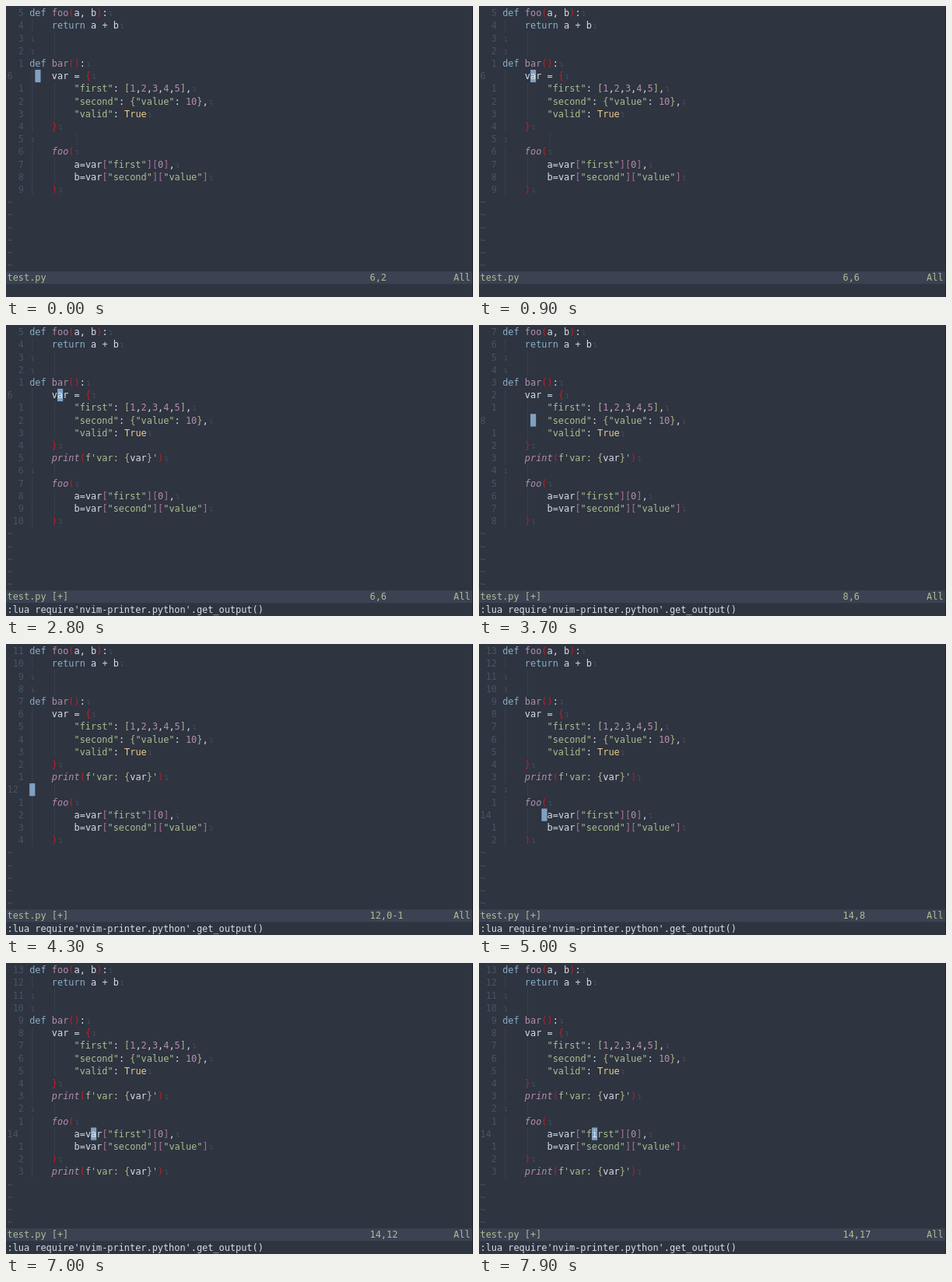
Write an HTML page that moves like this. It is 600x374 px and loops after 8000 ms.

```html
<!DOCTYPE html>
<html lang="en">
<head>
<meta charset="utf-8">
<title>Editor session</title>
<style>
html, body { margin: 0; width: 100%; height: 100%; overflow: hidden; background: #2e3440; }
svg { display: block; }
text { font-family: "DejaVu Sans Mono", "Noto Sans Mono", monospace; font-size: 11.9px; white-space: pre; }
</style>
</head>
<body>
<svg id="stage" width="600" height="374" viewBox="0 0 600 374"></svg>
<script>
const LOOP = 8000;
const X0 = 1.5, Y0 = 0.9, CW = 7.17, RH = 16.2, GUTTER = 4, STATUS = 21, PROMPT = 22;
const CMD = ":lua require'nvim-printer.python'.get_output()";

const INK = {
  k: '#88b0c8', f: '#b48ead', c: '#b48ead', w: '#d8dee9', o: '#c9d3d8',
  s: '#a9bf8f', n: '#b48ead', t: '#ebcb8b', r: '#c01f24', y: '#b3b38a', m: '#b0709a'
};
const DIM = '#4a5263', FAINT = '#424959', GUIDE = '#3b4251', BAR = '#3b4252',
  BAR_TEXT = '#aebd94', BLOCK = '#81a1c1', LIGHT = '#e5e9f0';

// Each line: code, one style letter per character
const PRINT = ["    print(f'var: {var}')", '    cccccrssssss ywwwysr'];
const BLANK = ['', ''];
const HEAD = [
  ['def foo(a, b):', 'kkk fffrww wrw'],
  ['    return a + b', '    kkkkkk w o w'],
  BLANK, BLANK,
  ['def bar():', 'kkk fffrrw'],
  ['    var = {', '    www o r'],
  ['        "first": [1,2,3,4,5],', '        sssssssw ynwnwnwnwnyw'],
  ['        "second": {"value": 10},', '        ssssssssw ysssssssw nnyw'],
  ['        "valid": True', '        sssssssw tttt'],
  ['    }', '    r']
];
const TAIL = [
  BLANK,
  ['    foo(', '    cccr'],
  ['        a=var["first"][0],', '        wowwwmsssssssmmnmw'],
  ['        b=var["second"]["value"]', '        wowwwmssssssssmmsssssssm'],
  ['    )', '    r']
];

// Cursor: time, line, column
const MOVES = [
  [0, 6, 2], [100, 6, 3], [300, 6, 4], [400, 6, 5], [600, 6, 6],
  [3300, 7, 6], [3600, 8, 6], [3800, 9, 6], [4000, 10, 5], [4100, 11, 6],
  [4200, 12, 0], [4400, 13, 6], [4500, 14, 6],
  [4800, 14, 7], [5000, 14, 8], [5100, 14, 9], [5200, 14, 10], [5300, 14, 11],
  [5600, 14, 12], [7300, 14, 13],
  [7500, 14, 14], [7600, 14, 15], [7700, 14, 16], [7800, 14, 17]
];
// Prompt: time, text, whether it holds the cursor, print lines added so far
const PROMPTS = [
  [0, '', false, 0], [1300, ':', true, 0], [1600, CMD, true, 0], [2500, CMD, false, 1],
  [6000, ':', true, 1], [6500, CMD, true, 1], [6800, CMD, false, 2]
];

const stage = document.getElementById('stage');
const at = (list, t) => list.findLast(e => e[0] <= t);
const colX = c => X0 + c * CW;
const rowY = r => Y0 + r * RH;
const esc = s => s.replace(/&/g, '&amp;').replace(/</g, '&lt;');

function rect(x, y, w, h, fill) {
  return `<rect x="${x.toFixed(2)}" y="${y.toFixed(2)}" width="${w}" height="${h}" fill="${fill}"/>`;
}

function text(col, row, str, fill, italic) {
  return `<text x="${colX(col).toFixed(2)}" y="${(rowY(row) + 12.2).toFixed(2)}" fill="${fill}"` +
    `${italic ? ' font-style="italic"' : ''}>${esc(str)}</text>`;
}

function block(col, row, ch) {
  return rect(colX(col), rowY(row), CW, RH, BLOCK) + (ch.trim() ? text(col, row, ch, LIGHT) : '');
}

function guide(col, row) {
  return rect(colX(col) + 3.1, rowY(row), 1, RH, GUIDE);
}

function codeLine([code, style], row) {
  let out = '';
  for (const run of style.matchAll(/([a-z])\1*/g)) {
    const part = code.substr(run.index, run[0].length);
    out += text(GUTTER + run.index, row, part, INK[run[1]], run[1] === 'c');
  }
  return out + text(GUTTER + code.length, row, '↴', FAINT);
}

function guides(code, row, added) {
  if (!code) return guide(GUTTER + (row > 4 && !added ? 8 : 4), row);
  const depth = code.search(/\S/);
  let out = '';
  for (let c = 0; c < depth; c += 4) out += guide(GUTTER + c, row);
  return out;
}

function draw(line, col, prompt, typing, added) {
  const lines = [...HEAD, ...(added > 0 ? [PRINT] : []), ...TAIL, ...(added > 1 ? [PRINT] : [])];
  let out = rect(0, 0, 600, 374, '#2e3440');
  lines.forEach((entry, row) => {
    const gap = Math.abs(row + 1 - line);
    const num = String(gap || line);
    out += guides(entry[0], row, added);
    out += text(gap ? 3 - num.length : 0, row, num, DIM);
    out += codeLine(entry, row);
  });
  for (let row = lines.length; row < STATUS; row++) out += text(0, row, '~', DIM);

  out += rect(0, rowY(STATUS), 600, RH, BAR);
  out += text(0, STATUS, 'test.py' + (added ? ' [+]' : ''), BAR_TEXT);
  out += text(65, STATUS, `${line},${col || '0-1'}`, BAR_TEXT);
  out += text(80, STATUS, 'All', BAR_TEXT);
  out += text(0, PROMPT, prompt, INK.w);

  if (typing) {
    out += block(prompt.length, PROMPT, ' ');
  } else {
    const c = Math.max(col - 1, 0);
    out += block(GUTTER + c, line - 1, lines[line - 1][0][c] || ' ');
  }
  out += rect(599, 0, 1, 374, '#20242d');
  stage.innerHTML = out;
}

let shown = '';
function update(t) {
  const [, line, col] = at(MOVES, t);
  const [, prompt, typing, added] = at(PROMPTS, t);
  const key = [line, col, prompt, typing, added].join();
  if (key === shown) return;
  shown = key;
  draw(line, col, prompt, typing, added);
}

const start = performance.now();
function tick() {
  update((performance.now() - start) % LOOP);
  requestAnimationFrame(tick);
}
tick();
</script>
</body>
</html>
```
